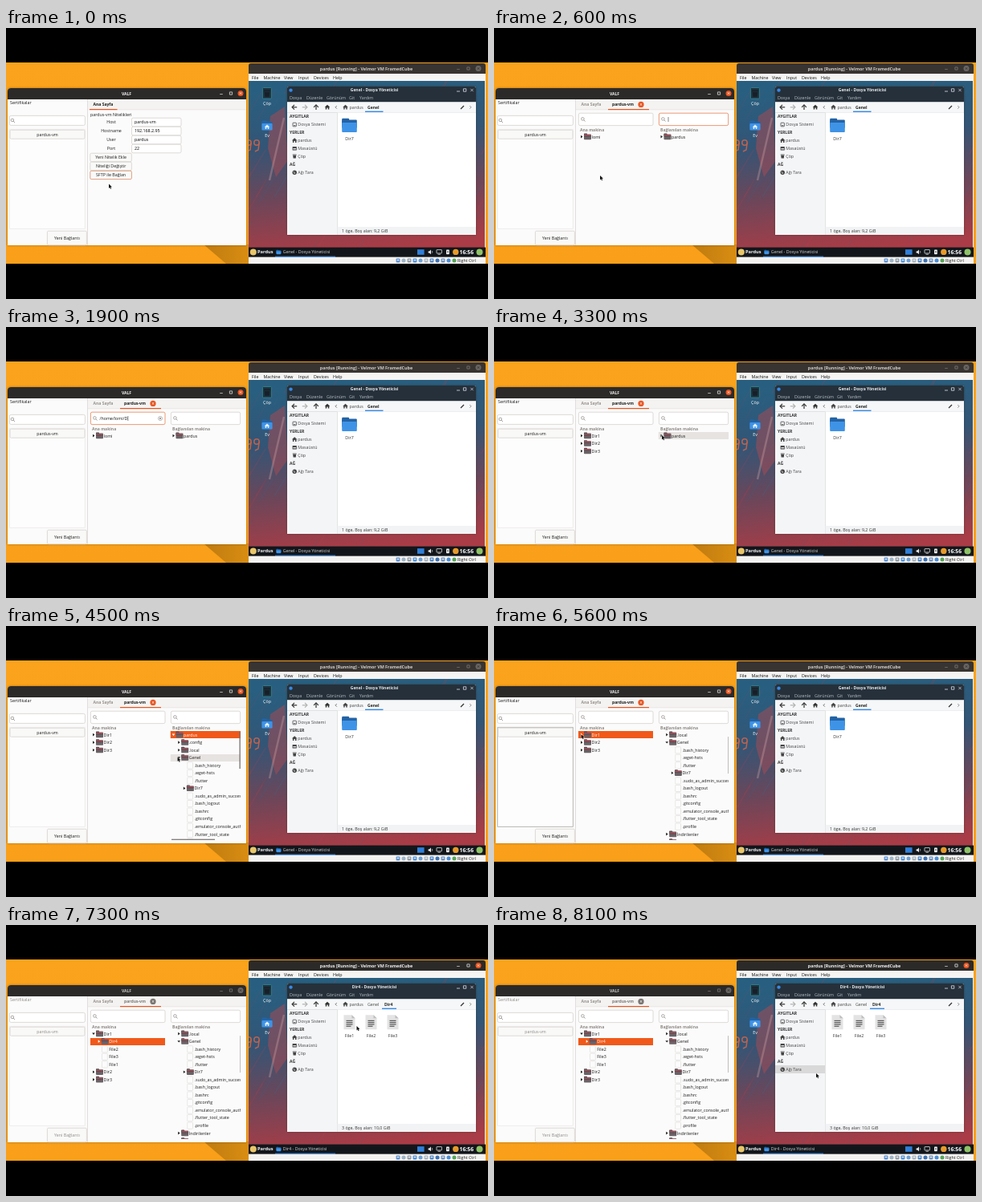
These frames come from a looping animation (600 px wide and 338 px high, 8.2 s). An HTML page with a canvas:

```html
<!DOCTYPE html>
<html lang="tr">
<head>
<meta charset="utf-8">
<title>VALF</title>
<style>
html, body { margin: 0; width: 100%; height: 100%; overflow: hidden; background: #000; }
canvas { display: block; width: 600px; height: 338px; }
</style>
</head>
<body>
<canvas id="stage"></canvas>
<script>
const LOOP = 8200, STEP = 100, PITCH = 9.54;
const USER = 'lomi', VM_TITLE = 'pardus [Running] - Velmor VM FramedCube';
const ORANGE = '#e95420', BLUE = '#3689e6', INK = '#1c1b1a';
const canvas = document.getElementById('stage');
const c = canvas.getContext('2d');
const dpr = window.devicePixelRatio || 1;
canvas.width = 600 * dpr;
canvas.height = 338 * dpr;

// pointer path: time, x, y
const PATH = [
  [0, 128, 194.5], [300, 131, 184], [600, 132, 184], [1000, 152, 114], [2700, 152, 116],
  [3300, 209, 135], [3700, 209, 135], [4300, 213.5, 163.5], [4600, 213.5, 163.5],
  [4900, 242, 190], [5200, 242, 190], [5500, 108.5, 135], [5700, 108.5, 135],
  [6000, 130, 145], [6200, 130, 145], [6600, 234, 145], [6750, 234, 145],
  [7050, 437, 127], [7300, 436.5, 126], [7500, 436, 130], [8100, 401, 185]
];

const clamp = v => Math.max(0, Math.min(1, v));
const ease = p => p * p * (3 - 2 * p);

function pointerAt(t) {
  let i = 0;
  while (i < PATH.length - 2 && t >= PATH[i + 1][0]) i++;
  const a = PATH[i], b = PATH[i + 1];
  const p = ease(clamp((t - a[0]) / (b[0] - a[0])));
  return { x: a[1] + (b[1] - a[1]) * p, y: a[2] + (b[2] - a[2]) * p };
}

function rect(x, y, w, h, fill) {
  c.fillStyle = fill;
  c.fillRect(x, y, w, h);
}
function round(x, y, w, h, r, fill, stroke) {
  c.beginPath();
  c.roundRect(x, y, w, h, r);
  if (fill) { c.fillStyle = fill; c.fill(); }
  if (stroke) { c.strokeStyle = stroke; c.lineWidth = 0.8; c.stroke(); }
}
function disc(x, y, r, fill) {
  c.fillStyle = fill;
  c.beginPath();
  c.arc(x, y, r, 0, 7);
  c.fill();
}
function ring(x, y, r, color, w = 0.7) {
  c.strokeStyle = color;
  c.lineWidth = w;
  c.beginPath();
  c.arc(x, y, r, 0, 7);
  c.stroke();
}
function poly(pts, fill) {
  c.beginPath();
  pts.forEach(([x, y]) => c.lineTo(x, y));
  c.closePath();
  c.fillStyle = fill;
  c.fill();
}
function line(pts, color, w = 0.8) {
  c.beginPath();
  pts.forEach(([x, y]) => c.lineTo(x, y));
  c.strokeStyle = color;
  c.lineWidth = w;
  c.stroke();
}
// y is the middle of the line of text
function text(s, x, y, color, { bold = false, align = 'left', size = bold ? 5.05 : 5.3 } = {}) {
  c.font = `${bold ? 700 : 500} ${size}px "Open Sans", sans-serif`;
  c.textAlign = align;
  c.fillStyle = color;
  c.fillText(s, x, y + size * 0.36);
}
const BOLD = { bold: true }, CENTER = { align: 'center' }, TITLE = { bold: true, align: 'center' };

function clip(x, y, w, h, draw) {
  c.save();
  c.beginPath();
  c.rect(x, y, w, h);
  c.clip();
  draw();
  c.restore();
}
function gradient(x0, y0, x1, y1, ...stops) {
  const g = c.createLinearGradient(x0, y0, x1, y1);
  stops.forEach((s, i) => g.addColorStop(i / (stops.length - 1), s));
  return g;
}

function magnifier(x, y) {
  ring(x - 0.6, y - 0.6, 1.8, '#8a8581');
  line([[x + 0.7, y + 0.7], [x + 2.5, y + 2.5]], '#8a8581');
}
function cross(x, y, r, color) {
  line([[x - r, y - r], [x + r, y + r]], color, 0.7);
  line([[x + r, y - r], [x - r, y + r]], color, 0.7);
}
function windowButtons(xs, y, focused) {
  const ink = focused ? '#dedede' : '#7d7875';
  line([[xs[0] - 1.8, y + 1], [xs[0] + 1.8, y + 1]], ink, 0.7);
  round(xs[1] - 1.6, y - 1.6, 3.2, 3.2, 0, null, ink);
  disc(xs[2], y, 3.5, focused ? ORANGE : '#6a6663');
  cross(xs[2], y, 1.3, focused ? '#fff' : '#2c2a29');
}
function expander(x, y, open, color) {
  poly(open ? [[x - 1.8, y - 1], [x + 1.8, y - 1], [x, y + 1.3]]
            : [[x - 1, y - 1.8], [x + 1.4, y], [x - 1, y + 1.8]], color);
}
function darkFolder(x, y) {
  round(x, y - 4, 4, 3, 0.6, '#4c4448');
  round(x, y - 3, 9, 6.6, 0.8, '#6a6266');
  rect(x + 0.6, y - 2.6, 7.8, 1.4, '#b04a58');
  rect(x, y - 0.9, 9, 0.7, '#4c4448');
}
function blankFile(x, y) {
  round(x + 0.8, y - 4, 6.8, 8.2, 0.6, '#fcfcfc', '#e4e2e0');
}
function blueFolder(x, y, w, h) {
  round(x, y, w * 0.48, h * 0.5, 1, '#2363a5');
  round(x, y + h * 0.1, w, h * 0.6, 1, '#2363a5');
  round(x, y + h * 0.3, w, h * 0.7, 1, '#3f93e6');
}
function house(x, y, color) {
  poly([[x, y - 3], [x + 3.3, y], [x + 2.3, y], [x + 2.3, y + 2.7], [x + 0.8, y + 2.7], [x + 0.8, y + 0.7],
    [x - 0.8, y + 0.7], [x - 0.8, y + 2.7], [x - 2.3, y + 2.7], [x - 2.3, y], [x - 3.3, y]], color);
}
function arrow(x, y, angle, color) {
  c.save();
  c.translate(x, y);
  c.rotate(angle);
  line([[3.2, 0], [-2.8, 0]], color, 1.2);
  line([[0, -2.9], [-2.9, 0], [0, 2.9]], color, 1.2);
  c.restore();
}
function drawPointer(p) {
  c.beginPath();
  [[0, 0], [0, 5.4], [1.2, 4.3], [2.1, 6.3], [3.1, 5.8], [2.2, 3.9], [3.9, 3.8]]
    .forEach(([x, y]) => c.lineTo(p.x + x, p.y + y));
  c.closePath();
  c.fillStyle = '#111';
  c.strokeStyle = '#fff';
  c.lineWidth = 0.7;
  c.stroke();
  c.fill();
}
function panel(x, y, w, h, r, fill) {
  c.save();
  c.shadowColor = 'rgba(30,15,0,.4)';
  c.shadowBlur = 3 * dpr;
  round(x, y, w, h, r, fill);
  c.restore();
}

function desktop() {
  rect(0, 0, 600, 338, '#000');
  rect(0, 43, 600, 251, gradient(0, 43, 0, 294, '#fba31c', '#f99f19'));
  poly([[246, 270], [302, 270], [302, 294], [274, 294]], gradient(250, 0, 302, 0, '#c07c10', '#d98d12'));
}

function entry(x, y, w, h, focus) {
  round(x, y, w, h, 1.8, '#fff', focus ? '#e98055' : '#d6d2ce');
}
function button(label, x, y, w, h, ink, border = '#d6d2ce') {
  round(x, y, w, h, 1.5, '#f9f9f8', border);
  text(label, x + w / 2, y + h / 2, ink, CENTER);
}

function homeTab(ink) {
  text('pardus-vm Nitelikleri', 105, 108.5, ink);
  [['Host', 'pardus-vm'], ['Hostname', '192.168.2.95'], ['User', 'pardus'], ['Port', '22']]
    .forEach(([label, value], i) => {
      const y = 117.5 + i * 11;
      text(label, 131, y, ink, CENTER);
      entry(156.5, y - 5.3, 61.5, 10.6);
      text(value, 160, y, '#000');
    });
  ['Yeni Nitelik Ekle', 'Niteliği Değiştir', 'SFTP ile Bağlan'].forEach((s, i) =>
    button(s, 104.8, 156.2 + i * 11, 51.6, 10.4, ink, i === 2 ? '#dc8a68' : undefined));
}

// row: [name, depth, kind, selected]; kind is 'open', 'shut' or 'file'
function tree(rows, x, w, scroll, p) {
  clip(x, 131, w, 136, () => rows.forEach(([name, depth, kind, selected], i) => {
    const y = 135.6 + i * PITCH - scroll;
    const over = p.x >= x && p.x < x + w && Math.abs(p.y - y) < PITCH / 2;
    if (selected || over) rect(x, Math.round(y - 4.6), w, 9, selected ? '#f0591a' : '#e6e3e1');
    const left = x + depth * 6.7, color = selected ? '#fff' : INK;
    if (kind === 'file') blankFile(left + 7, y);
    else {
      expander(left + 4, y, kind === 'open', color);
      darkFolder(left + 7, y);
    }
    text(name, left + 16.6, y, color);
  }));
}

function leftRows(t) {
  if (t < 2700) return [[USER, 0, 'shut']];
  const rows = [['Dir1', 0, t >= 5700 ? 'open' : 'shut', t >= 5500 && t < 6000]];
  if (t >= 5700) {
    rows.push(['Dir4', 1, 'shut', t >= 6000]);
    ['File2', 'File3', 'File1'].forEach(n => rows.push([n, 1, 'file']));
  }
  return rows.concat([['Dir2', 0, 'shut'], ['Dir3', 0, 'shut']]);
}
function rightRows(t) {
  if (t < 3600) return [['pardus', 0, 'shut', t >= 3400]];
  const open = t >= 4400;
  const rows = [['pardus', 0, 'open', t < 5500], ['.config', 1, 'shut'], ['.local', 1, 'shut'],
    ['Genel', 1, open ? 'open' : 'shut']];
  if (open) {
    '.bash_history .wget-hsts .flutter Dir7 .sudo_as_admin_successful .bash_logout .bashrc .gitconfig .emulator_console_auth_token .flutter_tool_state .profile'
      .split(' ').forEach(n => rows.push([n, 2, n === 'Dir7' ? 'shut' : 'file']));
  }
  return rows.concat(['İndirilenler', 'Masaüstü', 'Müzik', 'Resimler', 'Belgeler'].map(n => [n, 1, 'shut']));
}

// overlay scrollbars thin out when the pointer leaves the list
function scrollbars(scroll, hovered) {
  const y = 132 + scroll * 0.32;
  if (hovered) {
    rect(290.5, y, 1.3, 46, '#77726e');
    rect(206, 265.7, 54, 1.2, '#77726e');
  } else rect(291, y, 0.8, 46, '#b5b1ae');
}

function hostTab(t, p) {
  const typing = t >= 1000 && t < 2700;
  const rightFocus = t < 1000;
  entry(105.4, 106.2, 92.6, 15.4, typing);
  entry(205.4, 106.2, 86.2, 15.4, rightFocus);
  magnifier(111, 114);
  magnifier(211, 114);
  if (rightFocus) line([[217, 111], [217, 117]], '#333', 0.6);
  if (typing) {
    const path = `/home/${USER}/Demo`;
    const typed = path.slice(0, Math.max(0, Math.floor((t - 1100) / 800 * 12 + 0.01)));
    text(typed, 116.5, 114, INK);
    const end = 116.5 + c.measureText(typed).width + 0.5;
    line([[end, 111], [end, 117]], '#333', 0.6);
    if (typed) {
      ring(192, 114, 2.5, '#8c8783', 0.6);
      cross(192, 114, 1, '#77726e');
    }
  }
  text('Ana makina', 107, 126.7, '#8d8884', BOLD);
  text('Bağlanılan makina', 207, 126.7, '#8d8884', BOLD);

  const scroll = 2 * PITCH * clamp((t - 4900) / 300);
  tree(leftRows(t), 105, 93, 0, p);
  tree(rightRows(t), 204.5, 87.5, scroll, p);
  if (t >= 4400) scrollbars(scroll, p.x > 204 && p.x < 292);
}

function valf(t, p) {
  const active = t < 7100, connected = t >= 300;
  const ink = active ? INK : '#8f8b88';
  panel(2, 75, 297, 196, [4, 4, 0, 0], '#fbfbfb');
  round(2, 75, 297, 14, [4, 4, 0, 0], '#2c2a29');
  text('VALF', 150, 81.8, active ? '#f2f2f2' : '#c9c6c3', TITLE);
  windowButtons([268, 280, 292], 81.5, active);

  text('Sertifikalar', 5, 93, ink);
  entry(4.4, 109.4, 94, 12);
  magnifier(8.5, 115.5);
  const listEdge = active && t >= 4600 ? '#aaa6a3' : '#ebe9e7';
  round(4.4, 126.4, 94, 124, 0, '#fdfdfd', listEdge);
  button('pardus-vm', 5, 127.2, 93, 11, ink);
  button('Yeni Bağlantı', 51.4, 253.2, 49, 17.6, ink);

  rect(101, 89, 0.7, 182, '#d6d2ce');
  rect(102, 89, 197, 13, '#f4f3f2');
  rect(102, 101.6, 197, 0.6, '#dedad7');
  text('Ana Sayfa', 108.5, 95.4, connected ? '#96918d' : INK, BOLD);
  if (connected) {
    text('pardus-vm', 147, 95.4, active ? INK : '#7b7774', BOLD);
    disc(183, 95.4, 3.6, active ? ORANGE : '#77726e');
    cross(183, 95.4, 1.3, '#fff');
    rect(142, 101, 51, 1.2, ORANGE);
    hostTab(t, p);
  } else {
    rect(104, 101, 34.5, 1.2, ORANGE);
    homeTab(ink);
  }
}

function wallpaper() {
  clip(302, 66, 294, 208, () => {
    rect(302, 66, 294, 208, gradient(440, 66, 460, 274, '#285f80', '#335576', '#6e4659', '#a93c46'));
    let seed = 7;
    const rnd = () => (seed = seed * 16807 % 2147483647) / 2147483647;
    for (let i = 0; i < 110; i++) {
      const x = 295 + rnd() * 300, y = 66 + rnd() * 210, len = 8 + rnd() * 34;
      line([[x, y], [x + len * 0.6, y - len]],
        rnd() < 0.5 ? 'rgba(60,105,140,.25)' : 'rgba(185,65,75,.2)', 0.5 + rnd());
    }
    poly([[329, 110], [347, 98], [351, 165], [336, 186], [326, 150]], 'rgba(165,75,85,.55)');
    line([[346, 112], [328, 190]], 'rgba(205,165,165,.35)', 2.5);
    for (const x of [302, 312]) {
      ring(x, 143, 3.2, '#b9624f', 1.5);
      line([[x + 3.2, 143], [x + 2, 152], [x - 2, 154]], '#b9624f', 1.5);
    }
  });
}

function trash(x, y, s, color) {
  rect(x - 3 * s, y - 3 * s, 6 * s, 1.2 * s, color);
  poly([[x - 2.5 * s, y - 1.2 * s], [x + 2.5 * s, y - 1.2 * s], [x + 2 * s, y + 3.2 * s], [x - 2 * s, y + 3.2 * s]], color);
}
function page(x, y) {
  poly([[x - 7, y - 9], [x + 3, y - 9], [x + 7, y - 5], [x + 7, y + 9], [x - 7, y + 9]], '#e3e3e3');
  poly([[x + 3, y - 9], [x + 7, y - 5], [x + 3, y - 5]], '#bdbdbd');
  for (let i = 0; i < 4; i++) rect(x - 4, y - 2.5 + i * 2.3, i === 3 ? 6 : 8, 1.1, '#4c4c4c');
}

function fileManager(t, p, inDir4, title) {
  panel(350, 73, 235, 185, [2, 2, 0, 0], '#f4f5f7');
  round(350, 73, 235, 19.4, [2, 2, 0, 0], '#25303a');
  disc(354.5, 77.6, 2.2, BLUE);
  text(title, 458.5, 77.6, '#e8eaec', TITLE);
  line([[561, 79], [565, 79]], '#dde');
  round(569.4, 75.8, 3.4, 3.4, 0, null, '#dde');
  cross(580, 77.5, 1.7, '#dde');
  [['Dosya', 353], ['Düzenle', 374], ['Görünüm', 399], ['Git', 427], ['Yardım', 440]]
    .forEach(([s, x]) => text(s, x, 86.8, '#b9bfc6'));

  rect(350, 92.4, 235, 12.8, '#f6f7f8');
  rect(350, 105, 235, 0.6, '#d5d5d5');
  arrow(359, 98.8, 0, '#333');
  arrow(372, 98.8, Math.PI, '#b0b0b0');
  arrow(386, 98.8, Math.PI / 2, '#333');
  house(400, 98.8, '#333');
  line([[411.8, 97], [410, 98.8], [411.8, 100.6]], '#555');
  house(422.5, 98.8, '#444');
  text('pardus', 427.5, 98.8, '#444');
  text('Genel', 450, 98.8, inDir4 ? '#444' : '#222', { bold: !inDir4 });
  if (inDir4) text('Dir4', 471, 98.8, '#222', BOLD);
  rect(inDir4 ? 468 : 447, 103.6, inDir4 ? 18 : 22.5, 1.4, BLUE);
  line([[566, 101], [570, 97]], '#333', 1.3);
  line([[577.3, 97], [579, 98.8], [577.3, 100.6]], '#777');

  if (p.x > 350 && p.x < 412 && Math.abs(p.y - 180.2) < 5.3) rect(350, 175, 62, 10, '#d9d9d9');
  text('AYGITLAR', 353, 110.6, '#333', BOLD);
  text('YERLER', 353, 130.3, '#333', BOLD);
  text('AĞ', 353, 170, '#333', BOLD);
  round(357, 118.2, 4.4, 4.6, 0.6, null, '#444');
  rect(358, 121, 2.4, 0.7, '#444');
  house(359.2, 140.3, '#444');
  round(356.6, 148, 5.2, 4.4, 0.5, '#444');
  rect(357.4, 150, 3.6, 1.4, '#ddd');
  trash(359.2, 160, 0.8, '#444');
  disc(359.2, 180.2, 2.7, '#444');
  line([[357.6, 179.4], [359.4, 180.4], [359, 182]], '#eee');
  [['Dosya Sistemi', 120.5], ['pardus', 140.3], ['Masaüstü', 150.3], ['Çöp', 160.1], ['Ağı Tara', 180.2]]
    .forEach(([s, y]) => text(s, 363.3, y, '#444'));

  rect(412.4, 105.6, 172.6, 142.4, '#fff');
  rect(412, 105.6, 0.7, 152.4, '#d9d9d9');
  rect(412.7, 248, 172.3, 10, '#f2f3f4');
  const copied = t >= 6900;
  const names = inDir4 ? ['File1', 'File2', 'File3'] : copied ? ['Dir4', 'Dir7'] : ['Dir7'];
  names.forEach((n, i) => {
    const x = 427.5 + i * 27;
    if (inDir4) page(x, 121.3);
    else blueFolder(x - 9.3, 112.8, 18.6, 17.2);
    text(n, x, 137.6, '#333', CENTER);
  });
  text(`${names.length} öge, Boş alan: ${copied ? '10,0' : '9,2'} GiB`, 418, 253.2, '#333');
}

function taskbar(title) {
  rect(302, 273.6, 295, 12.2, '#12161b');
  disc(307.8, 279.4, 4, '#e8c66a');
  text('Pardus', 313, 279.4, '#f4f4f4', { bold: true, size: 5.7 });
  rect(335, 284.6, 75, 1.2, BLUE);
  blueFolder(336.4, 276.8, 6, 5.4);
  text(title, 344.8, 279.4, '#d8dadd');
  rect(512, 276.2, 8.6, 6.6, '#2f7fd8');
  poly([[525.6, 278.4], [527, 278.4], [529, 276.6], [529, 282.2], [527, 280.4], [525.6, 280.4]], '#eee');
  line([[530.2, 278], [530.8, 279.4], [530.2, 280.8]], '#eee', 0.6);
  round(536, 276.6, 6.4, 4.4, 0.4, null, '#ddd');
  rect(537.6, 281.8, 3.2, 0.8, '#ddd');
  round(548, 276.6, 3.8, 5.6, 0.8, '#eee');
  rect(549.2, 278.4, 1.4, 1.6, '#444');
  disc(559.8, 279.4, 3.7, '#e79a2b');
  text('16:56', 564.6, 279.4, '#fff', { bold: true, size: 6.8 });
  disc(589.5, 279.4, 4, '#8fc267');
}

function statusIcons() {
  rect(302, 285.8, 295, 8.2, '#f3f2f1');
  const colors = ['#5b8fd0', '#9fb6c8', '#8e9aa6', '#4a90d9', '#6fa3d8', '#a8b4bd', '#4f86c6', '#3f74b5', '#6a8fc0', '#4d8fd6', '#57a657'];
  colors.forEach((k, i) => {
    const x = 488 + i * 7;
    if (i % 3 === 1 || i > 8) disc(x, 290, 2.5, k);
    else {
      round(x - 2.4, 287.6, 4.8, 4.8, 0.8, k);
      rect(x - 1.2, 288.8, 2.4, 1.4, '#eef3f8');
    }
  });
  text('Right Ctrl', 562, 290, '#222');
}

function virtualMachine(t, p) {
  const active = t >= 7100, inDir4 = t >= 7200;
  const title = (inDir4 ? 'Dir4' : 'Genel') + ' - Dosya Yöneticisi';
  round(302, 44, 295, 14, [3, 3, 0, 0], active ? '#2c2a29' : '#383432');
  text(VM_TITLE, 448.5, 50.8, active ? '#f2f2f2' : '#d2cfcc', { ...TITLE, size: 5.4 });
  windowButtons([563, 575.5, 588], 50.5, active);
  rect(302, 57, 295, 237, '#f5f4f3');
  [['File', 306], ['Machine', 320.5], ['View', 346], ['Input', 364], ['Devices', 383], ['Help', 407]]
    .forEach(([s, x]) => text(s, x, 61.6, '#111'));
  wallpaper();
  round(319.4, 74.5, 11, 13.6, 1, '#20313c', '#2f8b93');
  trash(325, 81.5, 1.3, '#15202a');
  text('Çöp', 325, 94, '#fff', CENTER);
  blueFolder(318.4, 115.5, 13.2, 12);
  house(325, 123.4, '#e6f0fa');
  text('Ev', 325, 134, '#fff', CENTER);
  fileManager(t, p, inDir4, title);
  taskbar(title);
  statusIcons();
}

function frame(now) {
  const t = Math.floor((now - start) % LOOP / STEP) * STEP;
  const p = pointerAt(t);
  c.setTransform(dpr, 0, 0, dpr, 0, 0);
  desktop();
  virtualMachine(t, p);
  valf(t, p);
  if (t < 1200 || t >= 2700) drawPointer(p);
  requestAnimationFrame(frame);
}
const start = performance.now();
requestAnimationFrame(() => frame(performance.now()));
</script>
</body>
</html>
```
